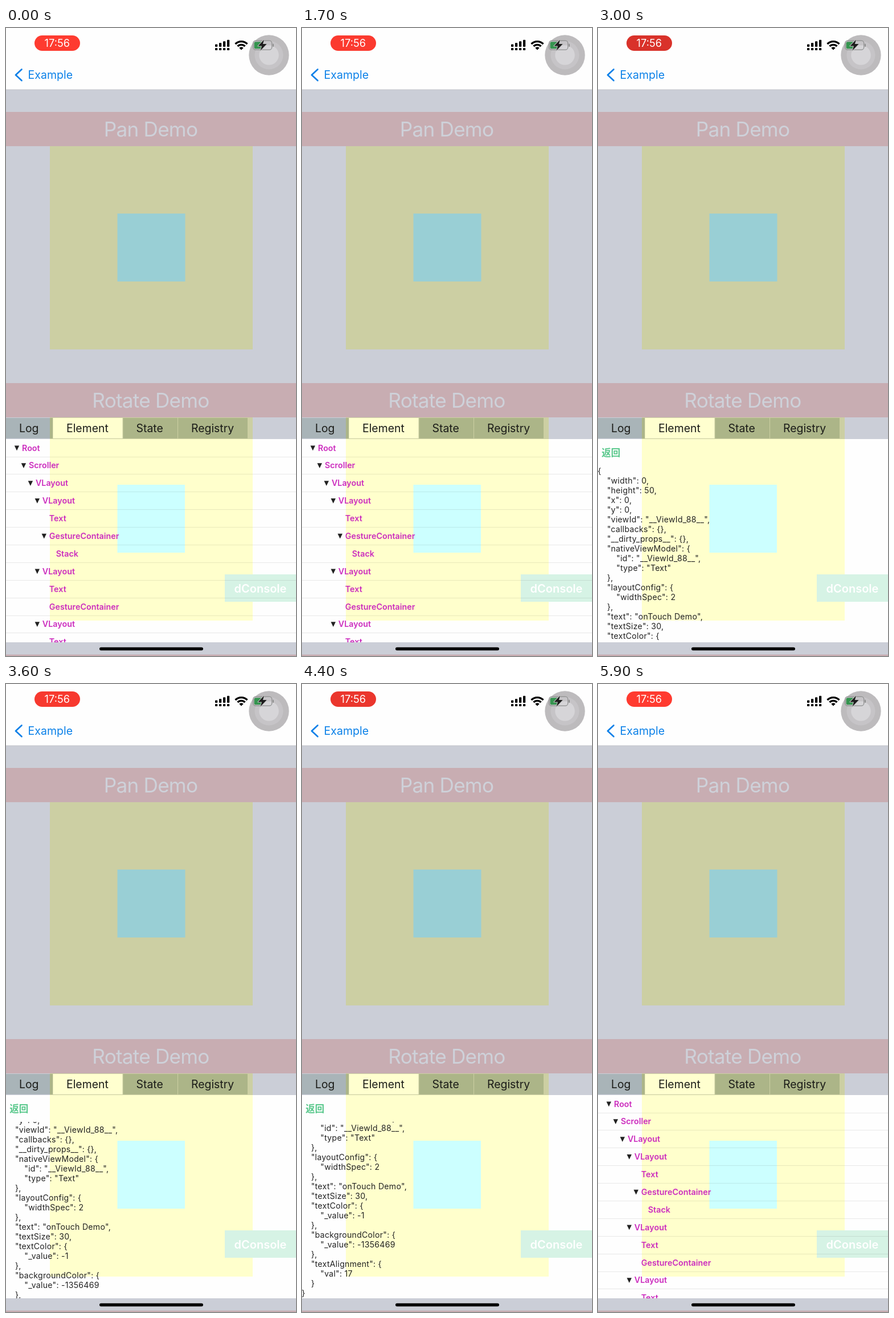
An HTML page with a canvas for the animation above (6000 ms loop, 509x1100 px).

```html
<!DOCTYPE html>
<html lang="en">
<head>
<meta charset="utf-8">
<title>Element inspector</title>
<style>
  html, body { margin: 0; width: 100%; height: 100%; overflow: hidden; background: #fff; }
  canvas { display: block; width: 509px; height: 1100px; }
</style>
</head>
<body>
<canvas id="stage" width="509" height="1100"></canvas>
<script>
const ctx = document.getElementById('stage').getContext('2d');
const W = 509, H = 1100, LOOP = 6000;
const PANEL_TOP = 720, PANEL_BOTTOM = 1076;
const GRAY = '#cbced7', PINK = '#c8adb2', OLIVE = '#cccfa3', TAB = '#acb588';

// name, depth, has children
const TREE = [
  ['Root', 0, 1], ['Scroller', 1, 1], ['VLayout', 2, 1], ['VLayout', 3, 1],
  ['Text', 4, 0], ['GestureContainer', 4, 1], ['Stack', 5, 0], ['VLayout', 3, 1],
  ['Text', 4, 0], ['GestureContainer', 4, 0], ['VLayout', 3, 1], ['Text', 4, 0]
];

const PROPS = JSON.stringify({
  width: 0, height: 50, x: 0, y: 0,
  viewId: '__ViewId_88__',
  callbacks: {}, __dirty_props__: {},
  nativeViewModel: { id: '__ViewId_88__', type: 'Text' },
  layoutConfig: { widthSpec: 2 },
  text: 'onTouch Demo', textSize: 30,
  textColor: { _value: -1 },
  backgroundColor: { _value: -1356469 },
  textAlignment: { val: 17 }
}, null, 4).split('\n');

function rect(x, y, w, h, color) {
  ctx.fillStyle = color;
  ctx.fillRect(x, y, w, h);
}

function pill(x, y, w, h, r, color) {
  ctx.fillStyle = color;
  ctx.beginPath();
  ctx.roundRect(x, y, w, h, r);
  ctx.fill();
}

function disc(x, y, r, color) {
  ctx.fillStyle = color;
  ctx.beginPath();
  ctx.arc(x, y, r, 0, Math.PI * 2);
  ctx.fill();
}

function poly(points, color) {
  ctx.fillStyle = color;
  ctx.beginPath();
  points.forEach(([x, y]) => ctx.lineTo(x, y));
  ctx.closePath();
  ctx.fill();
}

function text(str, x, y, size, color, { weight = 400, align = 'left', spacing = 0, family = 'Inter' } = {}) {
  ctx.font = `${weight} ${size}px ${family}, sans-serif`;
  ctx.letterSpacing = spacing + 'px';
  ctx.textAlign = align;
  ctx.fillStyle = color;
  ctx.fillText(str, x, y);
}

function clipped(y0, y1, draw) {
  ctx.save();
  ctx.beginPath();
  ctx.rect(0, y0, W, y1 - y0);
  ctx.clip();
  draw();
  ctx.restore();
}

// eased progress from 0 to 1
function ease(t, start, length) {
  const p = Math.min(1, Math.max(0, (t - start) / length));
  return p * p * (3 - 2 * p);
}

function drawStatusBar(t) {
  const glow = (1 + Math.cos((t - 1900) / 2000 * Math.PI * 2)) / 2;
  const mix = (a, b) => Math.round(a + (b - a) * glow);
  pill(50, 13, 80, 27, 13.5, `rgb(${mix(216, 255)},${mix(50, 59)},${mix(42, 48)})`);
  text('17:56', 89.8, 33.2, 18.2, '#fff', { align: 'center' });

  for (let i = 0; i < 4; i++) {
    const x = 367 + i * 7, h = 4.5 + i * 2.6;
    pill(x, 33 - h, 4.2, h, 1, '#000');
    pill(x, 35, 4.2, 4, 1, '#000');
  }

  ctx.save();
  ctx.beginPath();
  ctx.moveTo(413, 38.5);
  ctx.arc(413, 38.5, 17, -Math.PI * 0.75, -Math.PI * 0.25);
  ctx.clip();
  ctx.strokeStyle = '#000';
  ctx.lineWidth = 3.3;
  [9.2, 14.8].forEach(r => {
    ctx.beginPath();
    ctx.arc(413, 38.5, r, 0, Math.PI * 2);
    ctx.stroke();
  });
  disc(413, 38.5, 5.3, '#000');
  ctx.restore();
}

function drawAssistBall() {
  disc(461.5, 47.5, 35.2, '#bdbbbd');
  disc(461.5, 47.5, 25, '#c6c4c7');
  disc(461.5, 47.5, 17.3, '#d6d5d8');
}

function drawBattery() {
  ctx.strokeStyle = '#8f9090';
  ctx.lineWidth = 1.3;
  ctx.beginPath();
  ctx.roundRect(433.7, 22.2, 33, 16, 4.5);
  ctx.stroke();
  pill(468, 27.5, 2, 5.5, 1, '#8f9090');
  pill(435.6, 24.2, 12.5, 12, [2.5, 0, 0, 2.5], '#35944f');
  const bolt = [[453, 20.5], [442.5, 31.5], [449, 31.5], [446.5, 39.5], [457.5, 28], [450.8, 28]];
  ctx.strokeStyle = '#c2c2c2';
  ctx.lineWidth = 2;
  poly(bolt, '#1c1c1c');
  ctx.stroke();
  poly(bolt, '#1c1c1c');
}

function drawNav() {
  rect(0, 0, W, 108, '#fefefe');
  rect(0, 107.5, W, 1, '#c4c6cb');
  ctx.strokeStyle = '#0a80e8';
  ctx.lineWidth = 2.7;
  ctx.lineCap = 'round';
  ctx.lineJoin = 'round';
  ctx.beginPath();
  ctx.moveTo(27.5, 72.5);
  ctx.lineTo(17, 82.3);
  ctx.lineTo(27.5, 92);
  ctx.stroke();
  text('Example', 38.6, 89.3, 19.5, '#0a80e8');
}

function drawPage() {
  const title = { align: 'center', spacing: -0.8 };
  rect(0, 0, W, H, GRAY);
  rect(0, 147, W, 60, PINK);
  text('Pan Demo', 254, 190, 35.2, '#ced1d9', title);
  rect(77, 207, 356, 356, OLIVE);
  rect(195.5, 325, 119, 119, '#99cfd5');
  rect(0, 622, W, 60, PINK);
  text('Rotate Demo', 254, 665, 35.2, '#ced1d9', title);
  rect(77, 682, 356, 38, OLIVE);
  rect(0, 1097.5, W, 2.5, PINK);
}

function drawTabs() {
  const ink = '#1b1c18', top = 683, h = 35.8, y = 708.4, size = 19.4;
  rect(0, top, 77, h, '#a9b4b8');
  rect(77, top, 5, h, TAB);
  rect(82.5, top, 122, h, '#ffffcf');
  rect(205.5, top, 95.5, h, TAB);
  rect(302, top, 122, h, TAB);
  text('Log', 23, y, size, ink);
  text('Element', 106, y, size, ink);
  text('State', 228.5, y, size, ink);
  text('Registry', 325, y, size, ink);
}

function drawPanel() {
  rect(0, PANEL_TOP, W, PANEL_BOTTOM - PANEL_TOP, '#fefefe');
  rect(77, PANEL_TOP, 356, 318, '#ffffcc');
  rect(195.5, 800, 118.5, 119, '#ccffff');
  rect(384, 957, 125, 48, '#d6f3e5');
  text('dConsole', 446.5, 988.5, 20, '#fff', { weight: 600, align: 'center' });
}

function drawTree(x0) {
  TREE.forEach(([name, depth, open], i) => {
    const y = 735.6 + i * 30.88, x = x0 + 28 + depth * 11.95;
    rect(x0, Math.round(y + 15), W, 1, 'rgba(0,0,0,.085)');
    if (open) poly([[x - 13.2, y - 4.2], [x - 4.8, y - 4.2], [x - 9, y + 4.6]], '#222');
    text(name, x, y + 5, 14.3, '#cc2dbe', { weight: 600 });
  });
}

function drawProps(x0, scroll) {
  text('返回', x0 + 6.3, 750, 16.5, '#5ac88c', { weight: 700, family: '"Noto Sans CJK SC", "Noto Sans CJK"' });
  clipped(767, PANEL_BOTTOM, () => {
    PROPS.forEach((line, i) => {
      const body = line.trimStart();
      const indent = (line.length - body.length) * 4.1;
      text(body, x0 + indent - 0.5, 781 + i * 17 - scroll, 14.1, '#222', { spacing: 0.27 });
    });
  });
}

function draw(t) {
  const slide = W * (ease(t, 2375, 300) - ease(t, 4510, 300));
  const scroll = 151 * ease(t, 3090, 980);
  drawPage();
  drawNav();
  drawStatusBar(t);
  drawAssistBall();
  drawBattery();
  drawTabs();
  drawPanel();
  clipped(PANEL_TOP, PANEL_BOTTOM, () => {
    if (slide < W) drawTree(-slide);
    if (slide > 0) drawProps(W - slide, scroll);
  });
  pill(164, 1084.7, 182, 5.6, 2.8, '#000');
}

function tick() {
  draw(performance.now() % LOOP);
  requestAnimationFrame(tick);
}
tick();
</script>
</body>
</html>
```
